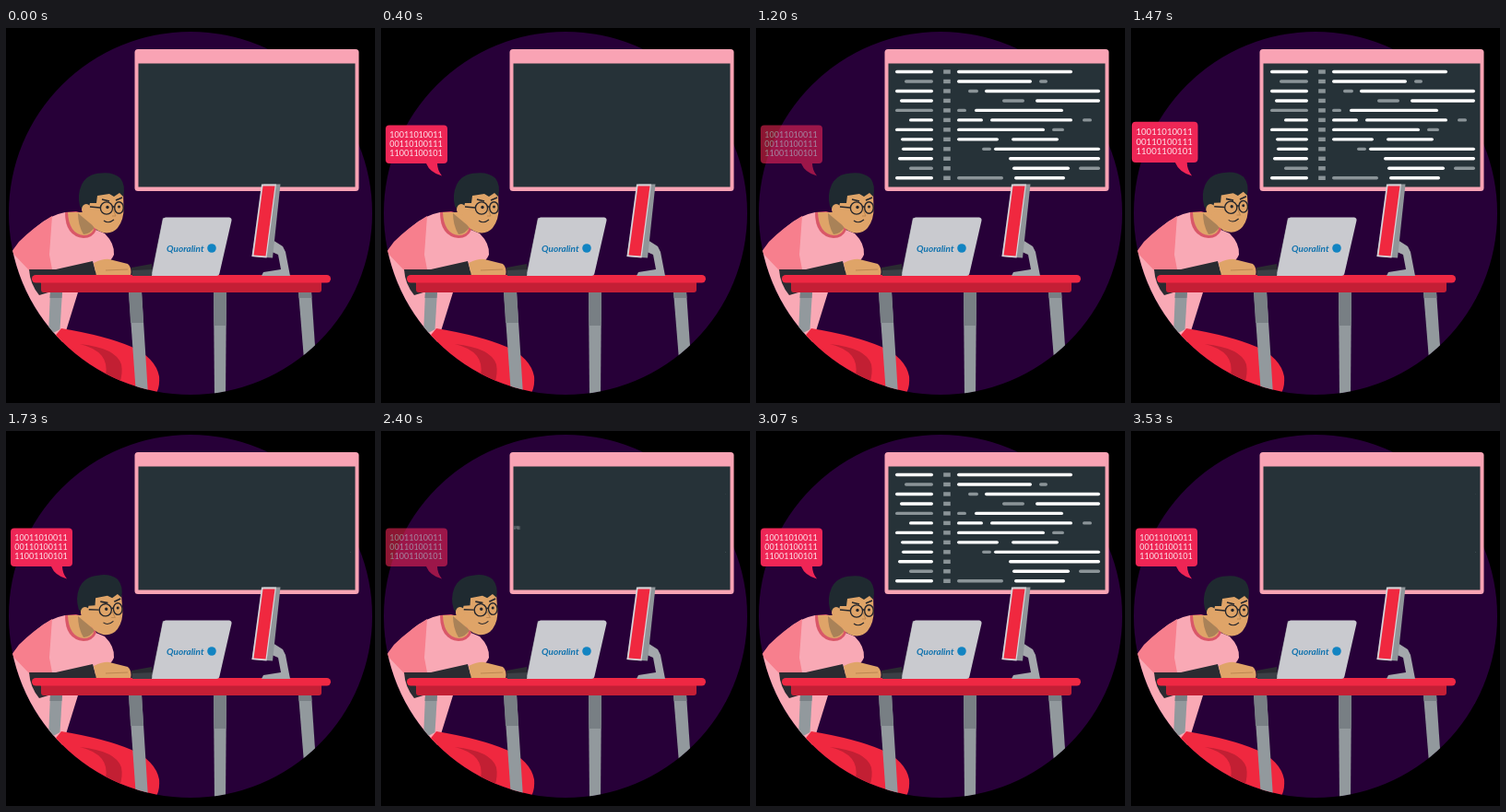
An HTML page for the animation above (3.59 s loop, 400 by 407 pixels).

```html
<!DOCTYPE html>
<html lang="en">
<head>
<meta charset="utf-8">
<title>Coding at the desk</title>
<style>
html, body { margin: 0; width: 100%; height: 100%; overflow: hidden; background: #000; }
svg { display: block; width: 400px; height: 407px; }
#bubble text { font: 9px Lato, sans-serif; fill: #fde3ea; text-anchor: middle; }
#brand { font: italic bold 10px Lato, sans-serif; fill: #0f72ae; }
</style>
</head>
<body>
<svg viewBox="0 0 400 407">
  <defs>
    <clipPath id="disc"><circle cx="200" cy="201" r="197"/></clipPath>
  </defs>
  <rect width="400" height="407"/>
  <circle cx="200" cy="201" r="197" fill="#270038"/>

  <!-- wall screen -->
  <rect x="139.500" y="23" width="243" height="154" rx="3.500" fill="#f9a3b4"/>
  <rect x="143.500" y="38.500" width="235" height="134" fill="#263238"/>
  <g id="code" stroke-width="3.400" stroke-linecap="round"></g>

  <!-- person -->
  <g clip-path="url(#disc)">
    <path d="M64 200Q48 203 34 215Q14 232 4 246L20 330L60 345L78 287L92 268Q113 256 117 246Q118 234 107 223L88 215Z" fill="#f9a9b5"/>
    <path d="M50 204Q30 216 14 232L6 243L26 264L50 262L47 246Z" fill="#f77f8d"/>
    <path d="M25 262L54 262L94 253L98 268L70 271L36 274L46 287L36 290Q26 278 25 262Z" fill="#2a2b31"/>
    <path d="M64 200Q64 226 84 228Q94 228 98 219L90 203L76 199Z" fill="#d95768"/>
    <path d="M67 200Q68 223 84 225Q92 225 95 219L88 200Z" fill="#dfa468"/>
    <path d="M78 201L96 216Q92 223 84 224Q78 214 78 201Z" fill="#a98258"/>
    <path d="M95 255Q106 250 112 251L132 256Q137 260 135 269H98Z" fill="#dfa468"/>
    <path d="M108 263L132 262" stroke="#bd8751" fill="none"/>
    <path d="M136 260L158 256L160 269H136Z" fill="#2a2b31"/>
    <g id="head">
      <path d="M86 180L127 178L127.500 195Q128 208 121 217Q115 224 105 222Q94 219 89 206L82 197Z" fill="#dfa468"/>
      <path d="M80 193Q77 181 82 170Q88 158 103 157.500Q116 156 124 163Q130 171 127 183L123 179L117 183L112 180L99 182L98 190L91 190L89 198Q83 200 80 193Z" fill="#1f2a30"/>
      <ellipse cx="87" cy="197" rx="5" ry="6" fill="#dfa468"/>
      <g fill="none" stroke="#26272c" stroke-width="1.400">
        <circle cx="109" cy="195.500" r="6.600"/>
        <ellipse cx="122.500" cy="195" rx="4.800" ry="6.300"/>
        <path d="M91 194L102 195M115.500 194L118 194"/>
        <path d="M104 186L112 188M119 187L126 184" stroke-width="1.700"/>
        <path d="M106 209Q111 213 117 208" stroke-width="1.100"/>
        <path d="M116 197L119 204L115 204" stroke="#bd8751" stroke-width="1"/>
      </g>
      <circle cx="110" cy="194.500" r="1.700" fill="#26272c"/>
      <circle cx="122.500" cy="194" r="1.500" fill="#26272c"/>
    </g>

    <!-- chair and table -->
    <path d="M40 350L60 326Q108 334 136 346Q162 358 166 378Q167 390 162 398L90 400Z" fill="#f0283f"/>
    <path d="M80 343Q119 347 125 365Q127 375 123 386L108 377Q113 351 80 343Z" fill="#c21f33"/>
    <g fill="#92999d">
      <path d="M48 286H61L58.500 327L46 334Z"/>
      <path d="M133 286H147L154 398H141Z"/>
      <path d="M225 286H239L238 400H226Z"/>
      <path d="M317 286H331L336 360H323Z"/>
    </g>
    <g fill="#787f84">
      <path d="M48 286H61L60.500 293L47.500 293Z"/>
      <path d="M133 286H147L149 320H135Z"/>
      <path d="M225 286H239L238.500 323H225.500Z"/>
      <path d="M317 286H331L331.500 293H317.500Z"/>
    </g>
  </g>
  <rect x="38" y="274" width="304" height="13" rx="3" fill="#c41f35"/>
  <rect x="28" y="268" width="324" height="8.500" rx="4.200" fill="#ef2843"/>

  <!-- side monitor -->
  <path d="M289 230L300 237L303 243L308 269H277L279 265L298 262L295 246L286 242Z" fill="#a4a8ac"/>
  <path d="M279 169.500H297.500L289 249.500L266.500 248Z" fill="#8f9599"/>
  <path d="M277 169.500H293L282.500 249.500L266.500 248Z" fill="#d6d4d8"/>
  <path d="M278.500 171.500H291.500L281.500 247.500L268.500 246.500Z" fill="#f0283f"/>

  <!-- laptop -->
  <path d="M137 263L160 262V269H137Z" fill="#3b3f45"/>
  <path d="M170 206L158 266L160 269L173 207Z" fill="#90949a"/>
  <path d="M173 205.500H242Q245 206 244.500 209L231.500 266Q231 269 228 269H158L170 208Q171 205.500 173 205.500Z" fill="#c9cacf"/>
  <text id="brand" x="174" y="243">Quoralint</text>
  <circle cx="223" cy="239" r="4.800" fill="#1284c2"/>

  <!-- speech bubble -->
  <g id="bubble">
    <path d="M9 105.500H68Q72 105.500 72 109.500V143Q72 147 68 147H61Q61 154 66 160.500Q53 157 49 147H9Q5 147 5 143V109.500Q5 105.500 9 105.500Z" fill="#ef2656"/>
    <text x="38" y="119">10011010011</text>
    <text x="38" y="129">00110100111</text>
    <text x="38" y="138.500">11001100101</text>
  </g>
</svg>
<script>
const LOOP = 3590;
const $ = id => document.getElementById(id);
const [code, head, bubble] = ['code', 'head', 'bubble'].map($);

// Per row: start of the left bar, then start/end pairs; a minus sign means grey.
const rows = [
  [151, 218, 343],
  [-161, 218, 299, -307, 316],
  [151, -230, 241, 248, 373],
  [156, -267, 291, 303, 373],
  [-151, -218, 228, 237, 333],
  [166, 218, 246, 254, 343, -354, 364],
  [151, 218, 313, -321, 334],
  [157, 218, 263, 277, 328],
  [158, -245, 255, 258, 373],
  [154, 274, 373],
  [-166, 278, 340, -350, 373],
  [151, -218, 268, 280, 335]
];

function bar(from, to, y) {
  const line = document.createElementNS('http://www.w3.org/2000/svg', 'path');
  line.setAttribute('d', `M${Math.abs(from) + 1.7} ${y}H${to - 1.7}`);
  line.setAttribute('stroke', from < 0 ? '#8b9498' : '#fff');
  code.append(line);
  return line;
}

rows.forEach(([left, ...parts], i) => {
  const y = 47.5 + i * 10.48;
  bar(left, 192, y);
  const mark = bar(-201.5, 212.5, y);
  mark.setAttribute('stroke-width', 4.4);
  mark.setAttribute('stroke-linecap', 'butt');
  for (let k = 0; k < parts.length; k += 2) bar(parts[k], parts[k + 1], y);
});

// Linear value at time t from [time, value] steps.
function at(t, steps) {
  if (t <= steps[0][0]) return steps[0][1];
  for (let i = 1; i < steps.length; i++) {
    const [t0, a] = steps[i - 1], [t1, b] = steps[i];
    if (t < t1) return a + (b - a) * (t - t0) / (t1 - t0);
  }
  return steps[steps.length - 1][1];
}

const pop = [[0, 0], [130, 1.15], [210, 1.07], [290, 1]];
const fade = [[1070, 1], [1240, 0]];
const grow = [[600, 0], [670, .35], [740, .72], [865, 1]];
const nod = [[1270, 0], [1600, -3], [2410, -3], [2700, 0]];

const zoom = (el, x, y, s) =>
  el.setAttribute('transform', `translate(${x} ${y}) scale(${s}) translate(${-x} ${-y})`);
const show = (el, on) => el.setAttribute('visibility', on ? 'visible' : 'hidden');

function draw(t) {
  const b = (t - 60) % 1200;
  show(bubble, b > 0);
  zoom(bubble, 65, 160, at(b, pop));
  bubble.setAttribute('opacity', at(b, fade));

  const c = t % (LOOP / 2);
  show(code, c > 600 && c < 1725);
  zoom(code, 144, 105, at(c, grow));

  head.setAttribute('transform', `rotate(${at(t, nod)} 85 218)`);
}

const start = performance.now();
function tick() {
  draw((performance.now() - start) % LOOP);
  requestAnimationFrame(tick);
}
draw(0);
requestAnimationFrame(tick);
</script>
</body>
</html>
```
